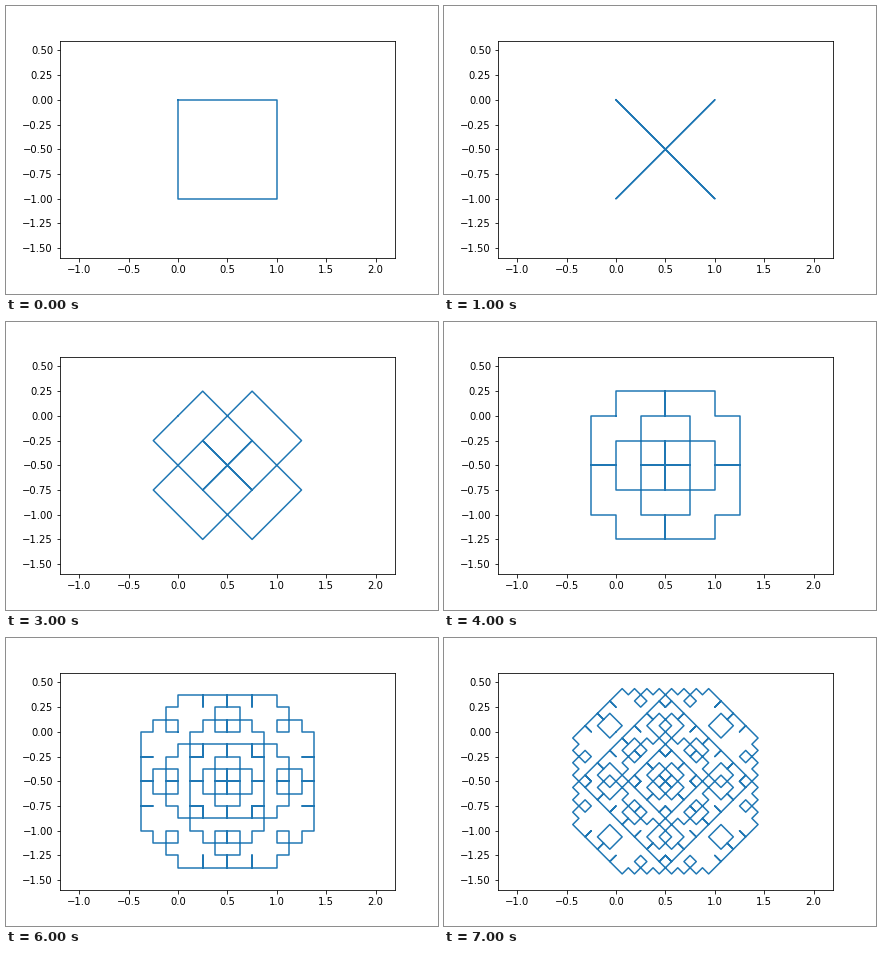
Recreate the animation shown at these times as a matplotlib script. Size 432x288 px, loop 8000 ms.

```python
import matplotlib.pyplot as plt
import numpy as np
from matplotlib.animation import FuncAnimation
from matplotlib.ticker import MultipleLocator

plt.rcParams.update({"font.family": "DejaVu Sans", "font.size": 10})

STEPS = 8
STEP_MS = 1000
SQUARE = np.array([0, 1, 1 - 1j, -1j, 0])


def levy(points):
    """Replace each segment by two legs of a right triangle on its right."""
    start, end = points[:-1], points[1:]
    refined = np.empty(2 * len(points) - 1, dtype=complex)
    refined[::2] = points
    refined[1::2] = (start + end) / 2 - 0.5j * (end - start)
    return refined


def curve(depth):
    points = SQUARE
    for _ in range(depth):
        points = levy(points)
    return points


fig = plt.figure(figsize=(6, 4), dpi=72, facecolor="white")
ax = fig.add_axes([0.125, 0.125, 0.775, 0.755])

# Equal scale on both axes, centred on the square.
half_height = 1.1
half_width = half_height * (0.775 * 432) / (0.755 * 288)
ax.set_xlim(0.5 - half_width, 0.5 + half_width)
ax.set_ylim(-0.5 - half_height, -0.5 + half_height)
ax.xaxis.set_major_locator(MultipleLocator(0.5))
ax.yaxis.set_major_locator(MultipleLocator(0.25))

line, = ax.plot([], [], color="#1f77b4", linewidth=1.5)


def update(depth):
    points = curve(depth)
    line.set_data(points.real, points.imag)
    return line,


anim = FuncAnimation(fig, update, frames=STEPS, interval=STEP_MS,
                     repeat=True, repeat_delay=0)
plt.show()
```
